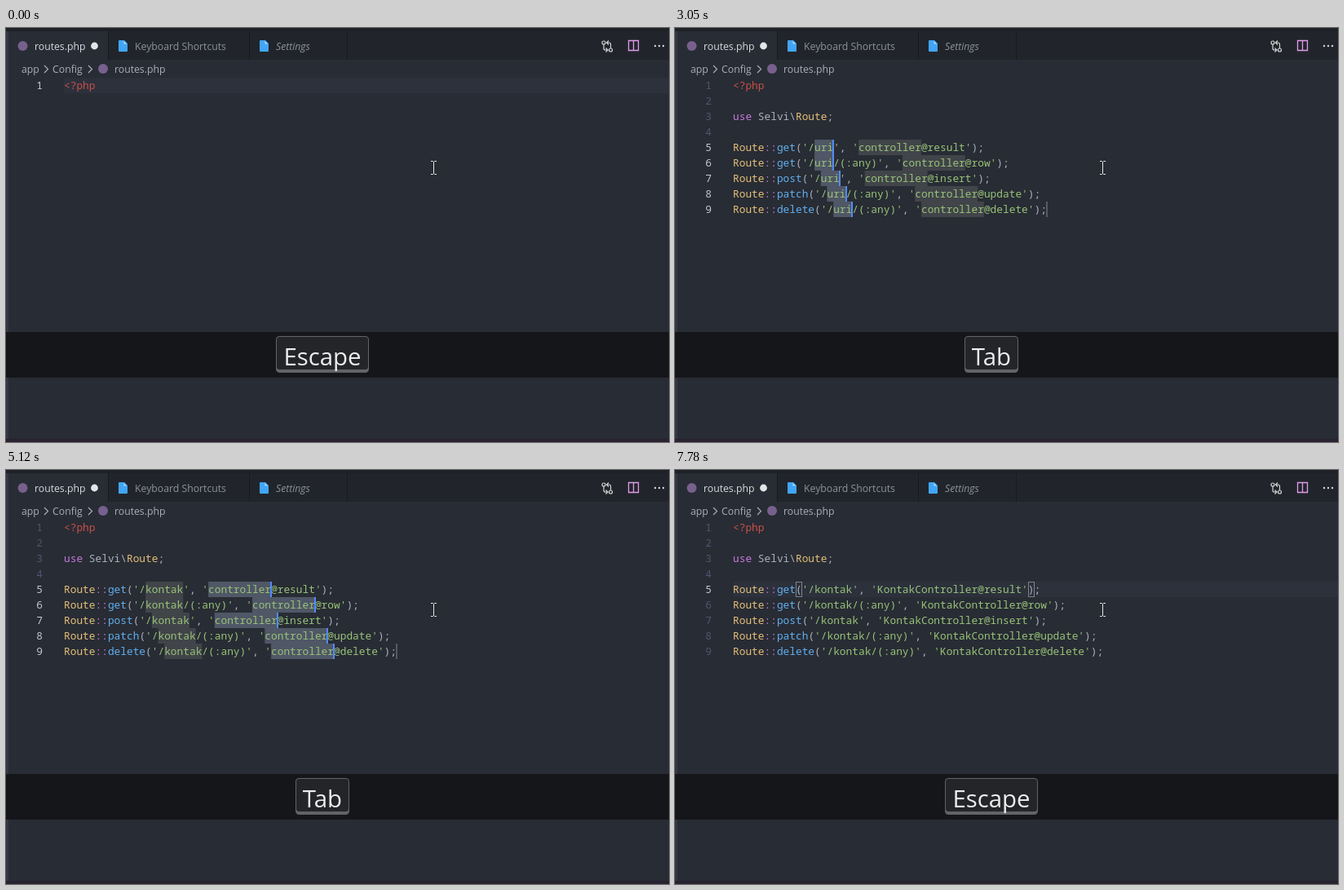
Animation of 813 by 508 pixels, one loop 8 s. Source, as an HTML page with a canvas:

```html
<!DOCTYPE html>
<html lang="en">
<head>
<meta charset="utf-8">
<title>Route snippet</title>
<style>
  html, body { margin: 0; width: 100%; height: 100%; overflow: hidden; background: #282c34; }
  canvas { display: block; width: 813px; height: 508px; }
</style>
</head>
<body>
<canvas id="stage"></canvas>
<script>
const W = 813, H = 508, LOOP = 8000;
const LEFT = 71, TOP = 61, ROW = 19, CHAR = 7.698;
const MONO = '12.83px "Noto Sans Mono", monospace';
const UI = '12.25px "Open Sans", sans-serif';
const C = {
  bg: '#282c34', bar: '#21252b', edge: '#181a1f', active: '#2c313c',
  plain: '#abb2bf', tag: '#c9504a', keyword: '#c678dd', type: '#e5c07b',
  call: '#61afef', string: '#98c379', word: '#d19a66',
  number: '#4c566f', numberOn: '#c3c8d1', caret: '#528bff',
  field: 'rgba(124,124,124,.3)', selection: 'rgba(103,118,150,.376)'
};

// Each step changes part of the editor state and holds until the next.
const steps = [
  [0, { line: 1, key: 'Escape', caret: false, word: '', menu: 0, routes: false, match: false }],
  [250, { line: 2, caret: true }],
  [370, { line: 3 }],
  [900, { caret: false }],
  [1150, { key: '' }],
  [1400, { caret: true }],
  [1800, { caret: false }],
  [2050, { word: 's', caret: true }],
  [2170, { word: 'sf' }],
  [2290, { menu: 3 }],
  [2410, { word: 'sfr' }],
  [2530, { word: 'sfrou', menu: 1 }],
  [2650, { word: 'sfroute' }],
  [2930, { routes: true, snippet: true, menu: 0, key: 'Tab', uri: 'uri', ctrl: 'controller', focus: 'uri', selected: true }],
  [3410, { caret: false }],
  [3660, { key: '' }],
  [3970, { caret: true }],
  [4350, { uri: 'ko', selected: false }],
  [4490, { uri: 'kont', match: true }],
  [4630, { uri: 'kontak' }],
  [4880, { key: 'Tab', focus: 'ctrl', selected: true, match: false }],
  [5250, { ctrl: 'K', selected: false }],
  [5370, { ctrl: 'Kon', match: true }],
  [5510, { ctrl: 'Konta' }],
  [5650, { ctrl: 'Kontak' }],
  [5770, { ctrl: 'KontakC' }],
  [5890, { ctrl: 'KontakCon' }],
  [6010, { ctrl: 'KontakCont' }],
  [6260, { ctrl: 'KontakContro' }],
  [6380, { ctrl: 'KontakControl' }],
  [6640, { ctrl: 'KontakControlle' }],
  [6760, { ctrl: 'KontakController' }],
  [7130, { caret: false }],
  [7380, { key: 'Escape', snippet: false, caret: true }],
  [7780, { caret: false }]
];

const routes = [
  ['get', '', 'result'],
  ['get', '/(:any)', 'row'],
  ['post', '', 'insert'],
  ['patch', '/(:any)', 'update'],
  ['delete', '/(:any)', 'delete']
];

const suggestions = [
  ['sfroutes', 'Selvi Routes'],
  ['sfmigration', 'Selvi Migration'],
  ['sfcontroller', 'Selvi Controller']
];

const canvas = document.getElementById('stage');
const g = canvas.getContext('2d');
const ratio = window.devicePixelRatio || 1;
canvas.width = W * ratio;
canvas.height = H * ratio;
g.scale(ratio, ratio);

const colX = col => LEFT + col * CHAR;
const rowY = line => TOP + (line - 1) * ROW;

function rect(x, y, w, h, color) {
  g.fillStyle = color;
  g.fillRect(x, y, w, h);
}

function text(str, x, y, color, font, align = 'left') {
  g.font = font;
  g.fillStyle = color;
  g.textAlign = align;
  g.fillText(str, x, y);
}

function path(d, fill, stroke, width = 1) {
  const p = new Path2D(d);
  if (fill) { g.fillStyle = fill; g.fill(p); }
  if (stroke) { g.strokeStyle = stroke; g.lineWidth = width; g.stroke(p); }
}

function circle(x, y, r, fill, stroke) {
  g.beginPath();
  g.arc(x, y, r, 0, Math.PI * 2);
  if (fill) { g.fillStyle = fill; g.fill(); }
  if (stroke) { g.strokeStyle = stroke; g.lineWidth = 1.2; g.stroke(); }
}

// Draws coloured runs on one line and returns the end column.
function code(line, runs, col = 0) {
  for (const [str, color] of runs) {
    text(str, colX(col), rowY(line) + 14, color, MONO);
    col += str.length;
  }
  return col;
}

function cells(line, col, count, color) {
  rect(colX(col), rowY(line), count * CHAR, ROW, color);
}

function caret(line, col) {
  rect(Math.round(colX(col)) - 1, rowY(line), 2, ROW, C.caret);
}

function bracketBox(line, col) {
  g.strokeStyle = '#7d828b';
  g.lineWidth = 1;
  g.strokeRect(Math.round(colX(col)) + .5, rowY(line) + .5, 7, ROW - 1);
}

function fileIcon(x) {
  path(`M${x + 1} 15h6l4 4v9q0 1-1 1h-9q-1 0-1-1v-12q0-1 1-1z`, '#42a5f5');
  path(`M${x + 6.5} 16v3.5h3.5z`, '#b4dcfb');
}

function frameUi() {
  rect(0, 0, W, H, C.bg);
  rect(0, 0, W, 39, C.bar);
  rect(0, 0, W, 4, '#1e2126');
  rect(3, 4, 122, 35, C.bg);
  for (const x of [125, 298, 418]) rect(x, 4, 1, 35, C.edge);
  rect(0, 4, 3, 500, '#333740');
  rect(0, 504, W, 4, '#2a2230');

  circle(20.5, 22, 6, '#77608d');
  text('routes.php', 35, 27, '#d7dae0', UI);
  circle(108.5, 22, 4.4, '#e3e5e8');
  fileIcon(138);
  text('Keyboard Shortcuts', 158, 27, '#8d919b', UI);
  fileIcon(311);
  text('Settings', 331, 27, '#8d919b', 'italic ' + UI);

  const icon = '#d4d4d4';
  circle(733, 18, 2, null, icon);
  circle(741.5, 27, 2, null, icon);
  path('M733 20v5q0 2 2 2h3M735.5 24.5l2.5 2.5l-2.5 2.5M741.5 25v-5q0-2-2-2h-3M739 15.5l-2.5 2.5l2.5 2.5', null, icon, 1.2);
  path('M763.5 15.5h12v12h-12zM769.5 15.5v12', null, '#e39cec', 1.3);
  for (const x of [796, 801, 806]) circle(x, 22, 1.2, icon);

  const crumb = '#a9aeb8';
  text('app', 19, 55, crumb, UI);
  text('Config', 57, 55, crumb, UI);
  circle(119, 50, 6, '#77608d');
  text('routes.php', 133, 55, crumb, UI);
  for (const x of [47, 101]) path(`M${x} 46l4.5 4.5l-4.5 4.5`, null, crumb, 1.2);
}

function lineNumbers(count, isActive) {
  for (let n = 1; n <= count; n++) {
    text(n, 45, rowY(n) + 14, isActive(n) ? C.numberOn : C.number, MONO, 'right');
  }
}

function highlightRow(line) {
  rect(LEFT, rowY(line), W - LEFT, ROW, C.active);
}

function suggestionMenu(s) {
  const x = Math.round(colX(s.word.length)), y = 118;
  const w = 432, h = s.menu * ROW + 4;
  rect(x, y, w, h, C.edge);
  rect(x + 1, y + 1, w - 2, h - 2, C.bar);
  rect(x + 1, y + 1, w - 2, ROW, '#2c313a');
  suggestions.slice(0, s.menu).forEach(([label, detail], i) => {
    const top = y + 1 + i * ROW + (i ? .5 : 0);
    path(`M${x + 7} ${top + 15}h-1.5v-11.5h12v11.5h-1.5`, null, '#c5c8cd', 1.1);
    g.setLineDash([1, 1]);
    path(`M${x + 7} ${top + 15}h9`, null, '#c5c8cd', 1.2);
    g.setLineDash([]);
    let matched = 0;
    [...label].forEach((ch, k) => {
      const hit = ch === s.word[matched];
      if (hit) matched++;
      text(ch, x + 23 + k * CHAR, top + 14, hit ? '#f0f2f5' : '#c3c7cf', (hit ? 'bold ' : '') + MONO);
    });
    text(detail, x + 421, top + 14, '#82868f', MONO, 'right');
  });
}

function draftView(s) {
  highlightRow(s.line);
  lineNumbers(s.line, n => n === s.line);
  code(1, [['<?php', C.tag]]);
  code(3, [[s.word, C.word]]);
  if (s.word.length > 1) {
    path('M71 117' + 'l2 -2l2 2'.repeat(4), null, C.word);
  }
  if (s.caret) caret(s.line, s.word.length);
  if (s.menu) suggestionMenu(s);
}

function routeLine(s, [verb, rest, action], i) {
  const line = 5 + i;
  const open = 7 + verb.length;
  const uriCol = open + 3;
  const ctrlCol = uriCol + s.uri.length + rest.length + 4;
  const live = s.snippet || i === 0;
  const showFields = s.snippet;

  if (live && !s.selected) highlightRow(line);
  if (showFields) {
    for (const [name, col] of [['uri', uriCol], ['ctrl', ctrlCol]]) {
      cells(line, col, s[name].length, C.field);
      if (s.selected && s.focus === name) cells(line, col, s[name].length, C.selection);
    }
  }
  const end = code(line, [
    ['Route', C.type], ['::', C.keyword], [verb, C.call], ['(', C.plain],
    [`'/${s.uri}${rest}'`, C.string], [', ', C.plain],
    [`'${s.ctrl}@${action}'`, C.string], [');', C.plain]
  ]);
  if (s.match && live) {
    bracketBox(line, open);
    bracketBox(line, end - 2);
  }
  if (showFields && i === routes.length - 1) {
    rect(Math.round(colX(end)) - 1, rowY(line), 2, ROW, '#565a61');
  }
  if (s.caret && live) {
    caret(line, s.focus === 'uri' ? uriCol + s.uri.length : ctrlCol + s.ctrl.length);
  }
}

function routesView(s) {
  routes.forEach((route, i) => routeLine(s, route, i));
  lineNumbers(9, n => s.snippet ? n >= 5 : n === 5);
  code(1, [['<?php', C.tag]]);
  code(3, [['use', C.keyword], [' Selvi\\', C.plain], ['Route', C.type], [';', C.plain]]);
}

function pointer(s) {
  const overMenu = s.menu === 3 && s.word.length === 3;
  if (overMenu) {
    path('M522 172q0-1.500 1.500-1.500t1.500 1.500v6l2-.5l2 .8l2 .5q1.800.5 1.800 2.500v4.500q0 2-1.500 4v2.500h-8v-2.500l-5-7q-.8-1.500.5-2.200t2.200.5l1 1z', '#fff', '#15171b', .8);
  } else {
    path('M521 163.500h2.500l1 1l1-1h2.500M524.500 164v15M521 179.500h2.500l1-1l1 1h2.500', null, '#e6e6e6', 1);
  }
}

function keyOverlay(key) {
  const w = key === 'Tab' ? 66 : 114, x = 388 - w / 2;
  rect(0, 373, W, 56, '#151619');
  g.beginPath();
  g.roundRect(x, 378, w, 45, 4.5);
  g.fillStyle = '#626365';
  g.fill();
  g.beginPath();
  g.roundRect(x + 1, 379, w - 2, 40, 3.5);
  g.fillStyle = '#242528';
  g.fill();
  text(key, 388, 414, '#eceded', '29.4px "Open Sans", sans-serif', 'center');
}

function stateAt(t) {
  const s = {};
  for (const [at, change] of steps) {
    if (at > t) break;
    Object.assign(s, change);
  }
  return s;
}

function render(t) {
  const s = stateAt(t);
  frameUi();
  (s.routes ? routesView : draftView)(s);
  pointer(s);
  if (s.key) keyOverlay(s.key);
}

const start = performance.now();
function tick() {
  render((performance.now() - start) % LOOP);
  requestAnimationFrame(tick);
}
tick();
</script>
</body>
</html>
```
